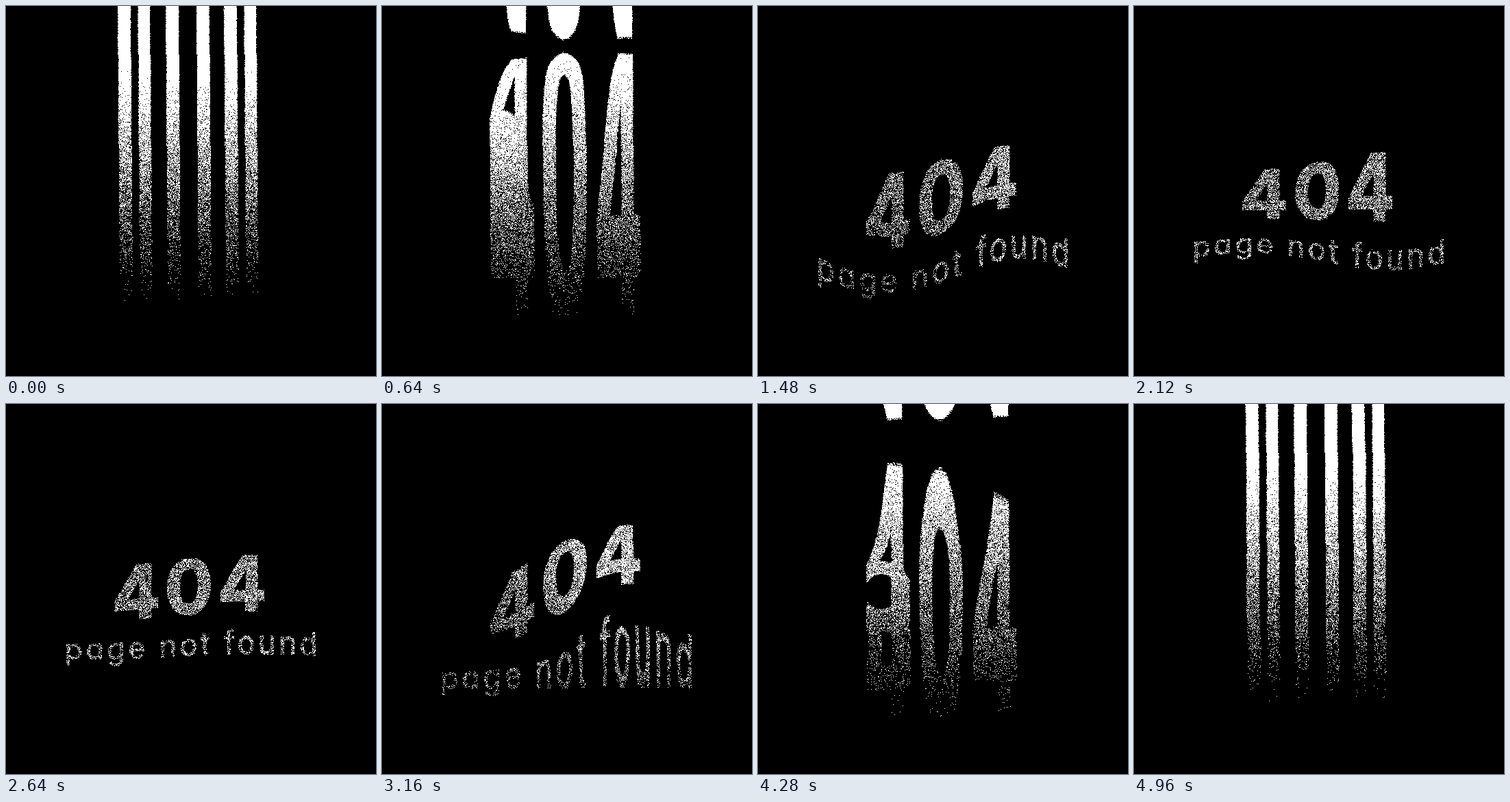
Recreate the animation shown at these times as an HTML page with a canvas. Size 540x540 px, loop 5000 ms.

```html
<!DOCTYPE html>
<html lang="en">
<head>
<meta charset="utf-8">
<title>404</title>
<style>
html, body { margin: 0; width: 100%; height: 100%; overflow: hidden; background: #000; }
canvas { display: block; width: 100vmin; height: 100vmin; }
</style>
</head>
<body>
<canvas id="stage" width="540" height="540"></canvas>
<script>
const SIZE = 540, MID = 270, LOOP = 5000, STEP = 40;
const SKEW = 0.0075;
const LEFT = 80, RIGHT = 460;
const WHITE = 0xffffffff, BLACK = 0xff000000;

const ctx = document.getElementById('stage').getContext('2d');
const image = ctx.createImageData(SIZE, SIZE);
const pixels = new Uint32Array(image.data.buffer);

const clamp = (v, lo, hi) => Math.min(hi, Math.max(lo, v));
const smooth = v => v * v * (3 - 2 * v);
const hill = (v, center, radius) => Math.exp(-(((v - center) / radius) ** 2));
const wave = (x, start, period) => Math.sin(2 * Math.PI * (x - start) / period);
const roll = (y, crest) => Math.cos((y - crest) / 115);
const ripple = y => Math.exp(-y / 40) * Math.cos(Math.PI * y / 85);

// Vertical sampling offsets; the motion fades from one gust to the next.
const calm = () => 0;

function openingGust(x, y) {
  const side = hill(x, 175, 45);
  return 2 + 6 * (y / 480) ** 2 + 10 * ripple(y) - 11 * hill(y, 62, 25)
    + side * (32 * hill(y, 190, 80) - 12 * hill(y, 62, 25));
}

const risingGust = (x, y) =>
  6 + 0.12 * (y - 330) + 24 * wave(x, 285, 400) * roll(y, 320);

const settlingGust = (x, y) => 20 * wave(x, 270, 400) * roll(y, 119);

const liftingGust = (x, y) => roll(y, 235) * (30 + 44 * wave(x, 235, 520)) - 26;

function closingGust(x, y) {
  const side = hill(x, 180, 45);
  return 20 * ripple(y) - 9 * (x / MID) ** 2 * hill(y, 160, 100)
    + side * (36 * hill(y, 265, 48) - 12 * hill(y, 365, 45));
}

const gusts = [
  { t: 0, offset: calm },
  { t: 640, offset: openingGust },
  { t: 1480, offset: risingGust },
  { t: 2120, offset: settlingGust },
  { t: LOOP / 2, offset: calm },
  { t: 3160, offset: liftingGust },
  { t: 4280, offset: closingGust },
  { t: LOOP, offset: calm }
];

function random(x, y, seed) {
  let h = Math.imul(x, 374761393) ^ Math.imul(y, 668265263) ^ Math.imul(seed + 1, 1274126177);
  h = Math.imul(h ^ (h >>> 15), 2246822519);
  h = Math.imul(h ^ (h >>> 13), 3266489917);
  return ((h ^ (h >>> 16)) >>> 0) / 4294967296;
}

// Places a line between two edges by tracking alone.
function drawLine(c, text, font, left, right, baseline, outline) {
  c.font = font;
  c.letterSpacing = '0px';
  const m = c.measureText(text);
  const ink = m.actualBoundingBoxLeft + m.actualBoundingBoxRight;
  c.letterSpacing = (right - left - ink) / (text.length - 1) + 'px';
  const x = left + m.actualBoundingBoxLeft;
  c.fillText(text, x, baseline);
  if (outline) {
    c.lineWidth = outline;
    c.strokeText(text, x, baseline);
  }
}

function makeMask() {
  const canvas = document.createElement('canvas');
  canvas.width = canvas.height = SIZE;
  const c = canvas.getContext('2d');
  c.fillStyle = c.strokeStyle = '#fff';
  drawLine(c, '404', '700 104px Inter, sans-serif', 159.5, 375.5, 308, 3);
  drawLine(c, 'p\u0251ge not found', '500 44px Inter, "Noto Sans", sans-serif', 87, 452, 366, 0);
  const data = c.getImageData(0, 0, SIZE, SIZE).data;
  return Uint8Array.from({ length: SIZE * SIZE }, (_, i) => data[i * 4 + 3]);
}

const mask = makeMask();

function draw(frame) {
  const t = frame * STEP;
  const scale = Math.sin(Math.PI * t / LOOP) ** 2;
  const reach = 178 - 33 * scale;
  const next = gusts.findIndex(gust => gust.t > t);
  const from = gusts[next - 1], to = gusts[next];
  const mix = (t - from.t) / (to.t - from.t);

  pixels.fill(BLACK);
  for (let x = LEFT; x < RIGHT; x++) {
    for (let y = 0; y < SIZE; y++) {
      const shift = from.offset(x, y) * (1 - mix) + to.offset(x, y) * mix;
      const srcY = MID + scale * (y - MID) + shift;
      if (srcY < 0 || srcY >= SIZE - 1) continue;
      const srcX = Math.round(x - (y - MID) * SKEW);
      const alpha = mask[Math.round(srcY) * SIZE + srcX];
      if (!alpha) continue;
      // Dots thin out the further a row is pulled down.
      const density = smooth(clamp(0.5 - (y - srcY + 7) / (2 * reach), 0, 1));
      if (random(x, y, frame) < density * alpha / 255) pixels[y * SIZE + x] = WHITE;
    }
  }
  ctx.putImageData(image, 0, 0);
}

let shown = -1;
function tick() {
  const frame = Math.floor(performance.now() % LOOP / STEP);
  if (frame !== shown) draw(shown = frame);
  requestAnimationFrame(tick);
}
tick();
</script>
</body>
</html>
```
